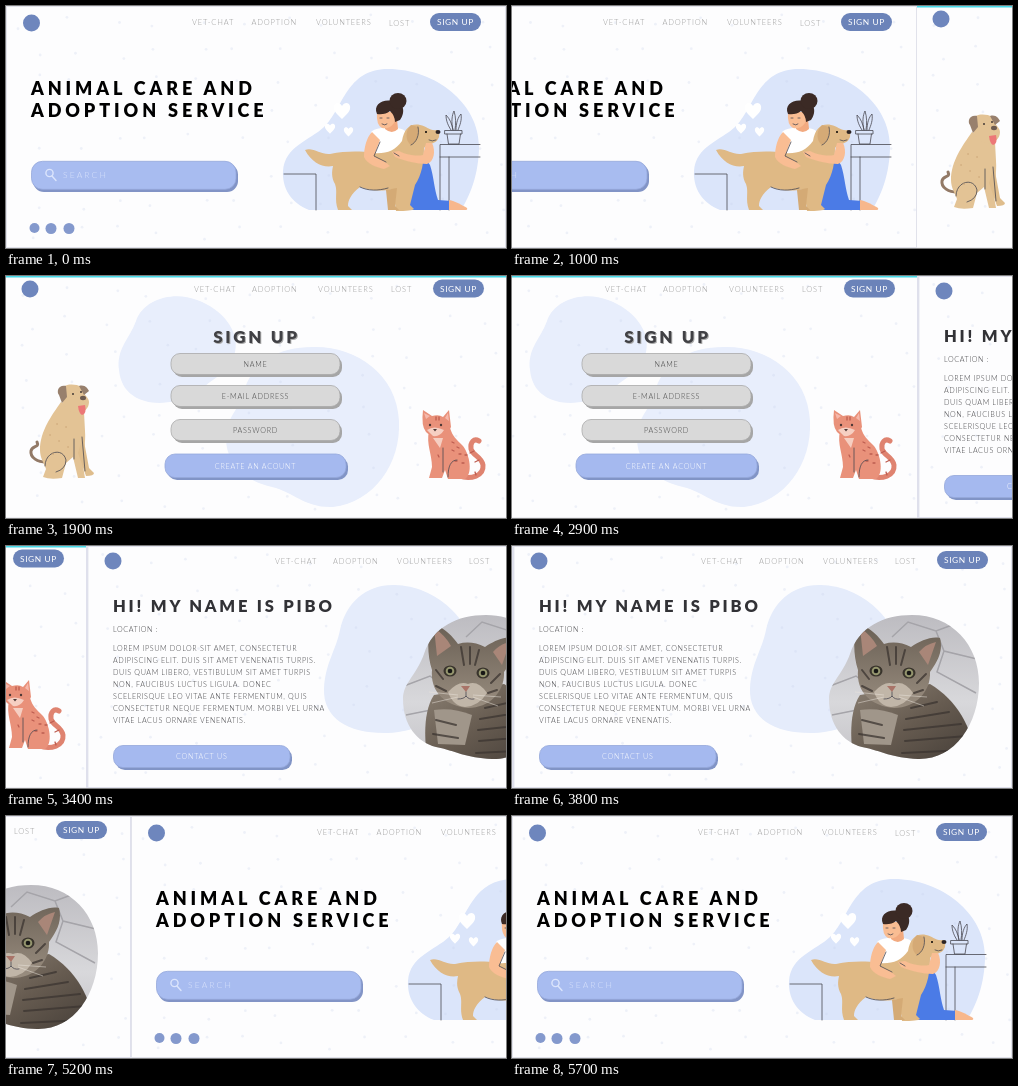
An HTML page for the animation above (5.72 s loop, 500 px wide and 242 px high).

```html
<!DOCTYPE html>
<html lang="en">
<head>
<meta charset="utf-8">
<title>Animal care and adoption service</title>
<style>
  html, body { margin: 0; width: 100%; height: 100%; overflow: hidden; background: #fdfdfe; }
  svg { display: block; width: 100vw; height: 100vh; }
  text { font-family: Lato, "Open Sans", sans-serif; font-size: 7.2px; font-weight: 300; letter-spacing: .75px; }
  .nav { font-size: 7.5px; letter-spacing: .85px; fill: #999; }
  .pill { font-size: 8.4px; letter-spacing: .6px; font-weight: 400; fill: #fff; }
  .title { font-weight: 900; }
  .hero { font-size: 18px; letter-spacing: 3.9px; }
  .head { font-size: 17px; letter-spacing: 2.7px; }
  .mid { text-anchor: middle; }
  .body { letter-spacing: .6px; fill: #404044; }
  .line { fill: none; stroke: #4b4a52; stroke-width: .8; stroke-linecap: round; stroke-linejoin: round; }
</style>
</head>
<body>
<svg viewBox="0 0 500 242" preserveAspectRatio="none">
  <g id="home">
    <rect width="500" height="242" fill="#fdfdfe"/>
    <path d="M303 204C285 197 276 182 277 165C279 140 303 135 318 121C337 103 340 63 382 63C430 63 473 98 473 140C473 168 464 190 455 204Z" fill="#dbe5fa"/>
    <g class="paws"></g>
    <g class="menu"></g>
    <text x="25" y="88.5" class="title hero">ANIMAL CARE AND</text>
    <text x="25" y="111" class="title hero">ADOPTION SERVICE</text>
    <rect x="27" y="157.5" width="205" height="28.5" rx="11" fill="#8294c6"/>
    <rect x="25.5" y="155.300" width="204.5" height="28" rx="11" fill="#a8bcf0" stroke="#96a9db" stroke-width=".8"/>
    <g fill="none" stroke="#dce5fc" stroke-width="1.4" stroke-linecap="round"><circle cx="43.5" cy="167" r="3.6"/><path d="M46 170L50 174.5"/></g>
    <text x="57" y="172" style="font-size:8.5px;letter-spacing:2.1px" fill="#dbe4fc">SEARCH</text>
    <g fill="#8499cd"><circle cx="28.5" cy="222" r="5"/><circle cx="45" cy="222.5" r="5.5"/><circle cx="63" cy="222.5" r="5.5"/></g>

    <g fill="#fff">
      <path id="heart" d="M336 113C331 108 327 105 328 100C329 96 334 96 336 100C338 96 343 96 344 100C345 105 341 108 336 113Z"/>
      <use href="#heart" transform="translate(114 57) scale(.625)"/>
      <use href="#heart" transform="translate(151 66) scale(.57)"/>
    </g>
    <path class="line" d="M278 168H310V204M474 138.5H434V204M434 151H474M443 151V204"/>
    <path class="line" fill="#eef2fc" d="M439 124.5H456V128H439ZM441 128L442.5 138H453L454.5 128M445 124C441 118 440 113 440 109C444 113 446 118 447 124M447 124C445 116 446 109 448 105C450 111 450 118 449 124M450 124C450 117 452 111 455 108C456 114 454 119 452 124"/>

    <!-- woman -->
    <path d="M400 153C411 151 421 153 424 159C428 171 428 183 432 194L446 195L444 204H404C399 190 397 170 400 153Z" fill="#4b7be6"/>
    <path d="M443 194C449 195 456 199 461 202Q462 204 459 204H443Z" fill="#f7b78c"/>
    <path d="M365 126C372 120 393 120 399 125L402 154H371Z" fill="#fff"/>
    <path d="M379 116L391 113L392 123Q386 129 379 123Z" fill="#f2aa80"/>
    <path d="M371 106Q370 119 376 122C384 124 391 117 391 106Z" fill="#f9bd93"/>
    <path d="M371 108C367 99 376 93 386 95C398 95 400 106 394 114L389 116Q389 110 384 105Q379 109 371 108Z" fill="#3b2a25"/>
    <ellipse cx="392" cy="95" rx="8.500" ry="8" fill="#3b2a25"/>
    <path d="M374 112h2M381 112h2M376 118q3 2 5 0" class="line"/>
    <!-- dog -->
    <path d="M299 144C307 141 315 149 324 148C340 145 354 145 367 147C380 148 389 145 396 135C398 123 404 117 414 119C421 120 423 125 431 124Q435 128 432 133C430 138 420 138 418 142C418 155 416 169 409 179L404 199L408 203Q406 205 390 205L387 183C373 186 362 184 354 181C345 188 342 194 342 200L346 204H332C328 193 332 186 329 178C325 171 326 165 327 160C317 162 306 157 299 144Z" fill="#dfb985"/>
    <path d="M391 182L389 200L393 204H382L380 184Z" fill="#d4aa75"/>
    <path d="M405 119C399 124 399 135 405 139C411 136 413 127 412 121Z" fill="#d5aa76"/>
    <path class="line" stroke="#84613e" d="M412 121C414 129 410 137 405 139M354 181C362 185 372 185 382 182M423 134Q426 136 430 134"/>
    <circle cx="420" cy="126" r="1"/><ellipse cx="432" cy="126" rx="2.500" ry="2" fill="#2d2524"/>
    <path d="M366 126C360 132 358 143 358 151C361 158 370 161 378 163L384 160L378 155L368 150L374 134Z" fill="#f9bd93"/>
    <path d="M420 137L426 137C430 145 428 156 421 158C411 158 399 155 389 151L386 146L393 145C403 150 412 150 417 149Z" fill="#f9bd93"/>
    <path class="line" stroke="#aa6c4d" d="M374 136L368 150L380 156M388 147L393 150"/>
    <path d="M.5 0V242M499.500 0V242M0 .5H500M0 241.500H500" stroke="#e1e2eb"/>
  </g>

  <g id="signup">
    <rect width="500" height="242" fill="#fdfdfe"/>
    <path d="M113 94C110 73 124 62 130 45C138 22 169 15 191 24C216 33 234 55 229 76C225 96 211 99 197 112C174 132 117 137 113 94Z" fill="#e8eefc"/>
    <path d="M220 165C218 143 232 137 238 115C247 85 274 70 310 71C350 71 391 98 393 145C395 188 368 226 327 231C298 232 288 216 266 211C240 205 222 190 220 165Z" fill="#e8eefc"/>
    <g class="paws"></g>
    <g class="menu"></g>
    <text x="251.5" y="67.5" class="title head mid" fill="#aaa">SIGN UP</text>
    <text x="250.5" y="66.5" class="title head mid" fill="#414145">SIGN UP</text>
    <g id="fields"></g>

    <!-- sitting dog -->
    <path d="M43 186C31 187 24 181 25 175C26 169 34 172 31 166" fill="none" stroke="#927966" stroke-width="3" stroke-linecap="round"/>
    <path d="M55 126C46 139 34 155 34 174C34 182 38 187 40 193L37 201Q44 204 56 202L60 187L67 181L72 202H79L77 190C77 178 80 167 79 155L78 136Z" fill="#e3c395"/>
    <path d="M77 160L83 192L88 197Q88 200 80 200L72 177Z" fill="#dfbd8c"/>
    <path d="M39 190C39 175 57 171 60 184Q60 193 50 196M68 163V183M76 161L79 195" class="line" stroke="#a78057"/>
    <path d="M55 113C58 108 68 107 76 111C77 119 83 121 83 126C83 133 77 138 69 137C59 136 54 124 55 113Z" fill="#e3c395"/>
    <path d="M60 110C53 108 50 115 53 119L56 127L61 121ZM73 110C79 108 82 113 83 115L78 119Z" fill="#98806d"/>
    <path d="M72 130L79 129Q81 138 76 139Q73 138 72 130Z" fill="#ec7777"/>
    <ellipse cx="77" cy="122" rx="3" ry="2.200" fill="#6d5b50"/><circle cx="67" cy="118" r="1" fill="#443a36"/><circle cx="75" cy="116" r="1" fill="#443a36"/>
    <path d="M51 148h.1M44 159h.1M53 165h.1M60 151h.1M62 171h.1M47 178h.1" stroke="#c9a273" stroke-width="1.400" stroke-linecap="round"/>

    <!-- cat -->
    <path d="M453 200C465 204 478 200 477 189C475 180 467 180 465 173C464 166 468 162 473 165" fill="none" stroke="#df8370" stroke-width="5" stroke-linecap="round"/>
    <path d="M423 155C420 168 426 178 426 191L423 202H436L439 194L442 203H459C467 198 464 179 457 170C450 163 447 161 444 152Z" fill="#e9917a"/>
    <path d="M417 134L426 140Q433 138 437 141L443 134L445 151C441 161 426 163 420 156Q415 150 417 134Z" fill="#e9917a"/>
    <path d="M421 154Q428 149 438 154Q434 161 427 160ZM427 162L437 162L434 172Z" fill="#f6cfc2"/>
    <path d="M418 137L420 143L424 140ZM442 137L439 142L443 145Z" fill="#f6b8ab"/>
    <path d="M430 141v3M433 141v3M446 166l2 1M451 171l2 1M446 174l2 1M453 178l2 0M459 179l2 0M449 185l2 0M456 187l2 0M432 179l1 2M464 177l4-2M469 186l4-2M470 199l-1-3" stroke="#bd5d50" stroke-width="1.300" stroke-linecap="round"/>
    <path class="line" stroke="#b95d50" d="M437 172V196M442 201C442 190 445 184 451 184"/>
    <g fill="#4c3937"><circle cx="424" cy="149" r="1.200"/><circle cx="435" cy="149" r="1.200"/><path d="M427 153h4l-2 2.500z"/></g>
    <path d="M0 .8H500" stroke="#48d9e8" stroke-width="1.600"/>
    <path d="M0 241.500H500" stroke="#eeeef3"/>
  </g>

  <g id="profile">
    <rect width="500" height="242" fill="#fdfdfe"/>
    <path d="M238 143C239 118 250 104 254 84C260 56 281 38 309 39C350 40 387 74 387 110C387 155 345 187 298 187C262 187 237 172 238 143Z" fill="#e5ecfb"/>
    <g class="paws"></g>
    <g class="menu"></g>
    <text class="title" x="27" y="66" style="font-size:16.5px;letter-spacing:2.8px" fill="#323236">HI! MY NAME IS PIBO</text>
    <g id="about"></g>
    <g id="contact"></g>
    <clipPath id="frame"><path d="M317 153C317 137 330 130 338 108C347 81 371 69 400 69C440 69 467 99 467 137C467 179 442 214 406 213C380 212 370 205 350 201C331 196 317 179 317 153Z"/></clipPath>
    <linearGradient id="stone" x2="0" y2="1"><stop stop-color="#bcbbc0"/><stop offset=".6" stop-color="#d8d8db"/><stop offset="1" stop-color="#c4c3c7"/></linearGradient>
    <linearGradient id="fur" x2="1" y2="1"><stop stop-color="#8b8073"/><stop offset=".5" stop-color="#665b50"/><stop offset="1" stop-color="#443d37"/></linearGradient>
    <linearGradient id="face" x2="0" y2="1"><stop stop-color="#695f54"/><stop offset="1" stop-color="#998d7f"/></linearGradient>
    <g clip-path="url(#frame)">
      <rect x="315" y="66" width="155" height="150" fill="url(#stone)"/>
      <path d="M318 140L344 130L364 146M320 169L350 163M380 91L396 76L424 85L451 75M424 85L432 105L465 113M432 105L425 126L464 147" fill="none" stroke="#a5a4a9" stroke-width="1.500"/>
      <path d="M348 149C337 165 338 195 342 216H462C463 184 445 154 418 138Z" fill="url(#fur)"/>
      <path d="M346 77C359 82 367 91 372 98Q385 94 399 101C408 95 419 90 428 92C432 107 423 119 418 126C419 145 404 162 382 162C359 160 344 146 346 124C341 109 341 89 346 77Z" fill="url(#face)"/>
      <path d="M348 82Q359 89 365 100L351 110ZM424 96Q414 98 407 106L416 119Z" fill="#a98678"/>
      <path d="M362 146Q373 134 382 138Q392 134 401 147Q393 160 379 161Q367 160 362 146Z" fill="#c1b6a8"/>
      <path d="M348 164Q366 161 386 169L379 199L352 198Z" fill="#a0968a"/>
      <path d="M375 101L378 119M384 101V118M393 104L389 119M350 124L357 133M414 128L405 137M350 140L360 145M411 144L402 147M399 162L425 156M394 173L437 166M392 184L449 178M393 195L455 190M390 207L454 204M350 174L370 179M347 188L372 192" fill="none" stroke="#3b3530" stroke-width="2" stroke-linecap="round" opacity=".75"/>
      <g fill="#39342c"><ellipse cx="364" cy="125" rx="6.500" ry="5.500"/><ellipse cx="397" cy="127" rx="6.500" ry="5.500"/></g>
      <g fill="#93946d"><circle cx="364" cy="125" r="4.300"/><circle cx="397" cy="127" r="4.300"/></g>
      <g fill="#171715"><circle cx="364" cy="125" r="2.300"/><circle cx="397" cy="127" r="2.300"/></g>
      <path d="M375 140H384L380 146Z" fill="#a97468"/>
      <path d="M380 146V150M372 153Q378 153 380 150Q383 154 388 153" class="line"/>
      <path d="M372 149L343 146M372 151L346 157M387 149L415 151M387 151L412 160" stroke="#e8e3da" stroke-width=".5"/>
    </g>
    <path d="M1.200 0V242" stroke="#dfe0ec" stroke-width="2.400"/>
    <path d="M499.500 0V242M0 .5H500M0 241.500H500" stroke="#dfe0ec"/>
  </g>
</svg>
<script>
const LOOP = 5720, STAY = 1900, STEP = 100, WIDTH = 500;
const pages = ['home', 'signup', 'profile'].map(id => document.getElementById(id));
const label = (x, y, s, cls, extra = '') => `<text x="${x}" y="${y}" class="${cls}" ${extra}>${s}</text>`;

function menu(page, logo, links, [linkY, lostY], pill) {
  const names = ['VET-CHAT', 'ADOPTION', 'VOLUNTEERS', 'LOST'];
  page.querySelector('.menu').innerHTML =
    `<circle cx="${logo[0]}" cy="${logo[1]}" r="8.5" fill="#6e86bd"/>` +
    names.map((s, i) => label(links[i], s === 'LOST' ? lostY : linkY, s, 'nav')).join('') +
    `<rect x="${pill[0]}" y="${pill[1]}" width="51" height="18" rx="9" fill="#6b83b9"/>` +
    label(pill[0] + 25.5, pill[1] + 12, 'SIGN UP', 'pill mid');
}
menu(pages[0], [25.5, 17], [186, 245.5, 310, 383], [19, 20], [424, 7]);
menu(pages[1], [24, 13], [188, 246, 312, 385], [16, 16], [427, 3.5]);
menu(pages[2], [27, 15], [189, 247, 311, 383], [17.5, 17.5], [425, 5]);

function button(x, y, w, h, s, main) {
  const [fill, edge, shade, ink] = main
    ? ['#a5b9ef', '#96a9db', '#8194c6', '#fff'] : ['#d9d9d9', '#aaa', '#a6a6a6', '#444'];
  const r = h * .43;
  return `<rect x="${x + 2}" y="${y + 2.5}" width="${w}" height="${h}" rx="${r}" fill="${shade}"/>` +
    `<rect x="${x}" y="${y}" width="${w}" height="${h}" rx="${r}" fill="${fill}" stroke="${edge}" stroke-width=".8"/>` +
    label(x + w / 2, y + h / 2 + 2.8, s, 'mid', `fill="${ink}"`);
}
document.getElementById('fields').innerHTML =
  button(165, 77.5, 169, 21, 'NAME') + button(165, 109.5, 169, 21, 'E-MAIL ADDRESS') +
  button(165, 143.5, 169, 21, 'PASSWORD') + button(159, 178, 181, 23.5, 'CREATE AN ACOUNT', true);
document.getElementById('contact').innerHTML = button(27.5, 199.5, 176.5, 22, 'CONTACT US', true);

const story = [
  'LOREM IPSUM DOLOR SIT AMET, CONSECTETUR',
  'ADIPISCING ELIT. DUIS SIT AMET VENENATIS TURPIS.',
  'DUIS QUAM LIBERO, VESTIBULUM SIT AMET TURPIS',
  'NON, FAUCIBUS LUCTUS LIGULA. DONEC',
  'SCELERISQUE LEO VITAE ANTE FERMENTUM, QUIS',
  'CONSECTETUR NEQUE FERMENTUM. MORBI VEL URNA',
  'VITAE LACUS ORNARE VENENATIS.'
];
document.getElementById('about').innerHTML = label(27, 85.5, 'LOCATION :', 'body') +
  story.map((s, i) => label(27, 104.8 + i * 12.1, s, 'body')).join('');

// Faint scattered paw marks behind each page's content
let seed = 7;
const random = () => (seed = seed * 16807 % 2147483647) / 2147483647;
for (const page of pages) {
  let marks = '';
  for (let y = 8; y < 240; y += 30)
    for (let x = 12; x < 500; x += 42)
      marks += `<circle cx="${x + random() * 24}" cy="${y + random() * 16}" r="1.4"/>`;
  const paws = page.querySelector('.paws');
  paws.setAttribute('fill', '#c9d3ec');
  paws.setAttribute('opacity', '.28');
  paws.innerHTML = marks;
}

function draw(ms) {
  const t = ms % LOOP;
  const current = Math.floor(t / STAY);
  const u = Math.max(0, Math.floor((t - current * STAY) / STEP) - 9) / 10;
  const shift = Math.round(WIDTH * (1 - (1 - u) ** 2));
  pages.forEach((page, i) => {
    const slot = (i - current % 3 + 3) % 3;
    page.setAttribute('transform', `translate(${slot * WIDTH - shift})`);
    page.style.display = slot < 2 ? '' : 'none';
  });
}
function tick() {
  draw(performance.now());
  requestAnimationFrame(tick);
}
tick();
</script>
</body>
</html>
```
